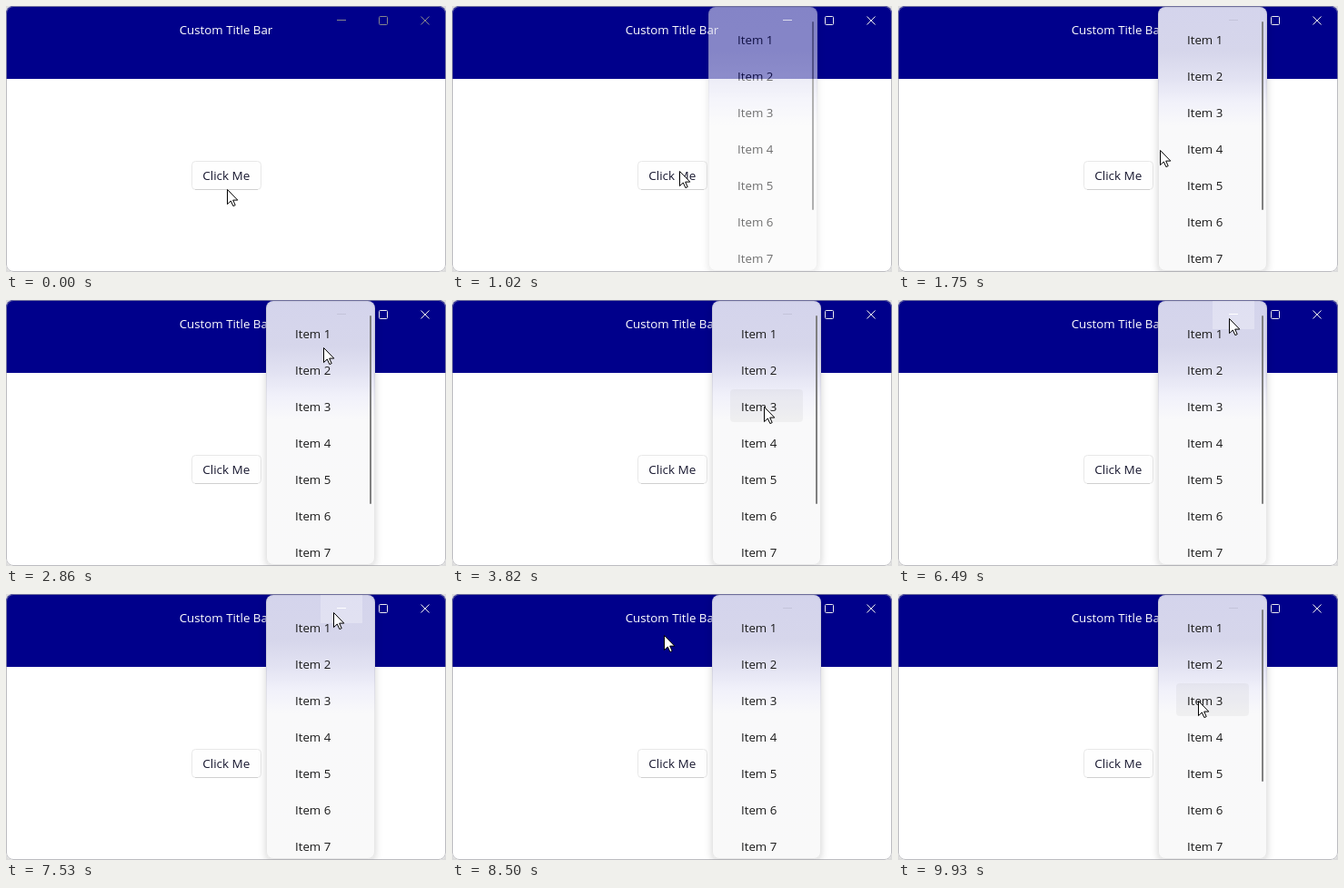
An HTML page for the animation above (10 s loop, 484 by 292 pixels).

```html
<!DOCTYPE html>
<html lang="en">
<head>
<meta charset="utf-8">
<title>Custom title bar</title>
<style>
  html, body { margin: 0; width: 484px; height: 292px; overflow: hidden; background: #dcdcdc; }
  svg { display: block; }
  text { font: 13.3px "Open Sans", "Noto Sans", sans-serif; }
  .mid { text-anchor: middle; }
  .glyph { fill: none; stroke-width: 1; }
  #face { filter: drop-shadow(0 3px 4px rgba(0, 0, 0, .17)); }
</style>
</head>
<body>
<svg width="484" height="292" viewBox="0 0 484 292">
  <defs>
    <linearGradient id="frosted" x1="0" y1="0" x2="0" y2="1">
      <stop offset="0" stop-color="#d4d4ec"/>
      <stop offset=".17" stop-color="#d6d6eb"/>
      <stop offset=".27" stop-color="#e2e2f2"/>
      <stop offset=".36" stop-color="#f1f1fa"/>
      <stop offset=".45" stop-color="#f9f9fa"/>
      <stop offset="1" stop-color="#f9f9f9"/>
    </linearGradient>
    <clipPath id="frame"><rect width="484" height="292" rx="8"/></clipPath>
    <clipPath id="sheet"><rect x="286" y="1" width="120" height="290" rx="8"/></clipPath>
  </defs>

  <g clip-path="url(#frame)">
    <rect width="484" height="292" fill="#fff"/>
    <rect width="484" height="80" fill="#00008b"/>
    <rect x="204.5" y="170.5" width="76" height="31" rx="4" fill="#fefefe" stroke="#e8e8e8"/>
    <path d="M208 201.5H277" stroke="#d0d0d0"/>
    <text id="label" class="mid" x="242.3" y="191" style="font-size:13.5px">Click Me</text>
    <text class="mid" x="242" y="31" fill="#fff">Custom Title Bar</text>
    <g id="caption" class="glyph">
      <path d="M364 15.5H374"/>
      <rect x="410.5" y="11.5" width="9" height="9" rx="1"/>
      <path d="M456.5 11.5L465.5 20.5M465.5 11.5L456.5 20.5"/>
    </g>

    <g id="menu">
      <rect id="face" x="286" y="1" width="120" height="290" rx="8" fill="url(#frosted)"/>
      <rect x="286.5" y="1.5" width="119" height="289" rx="7.5" fill="none" stroke="#000" stroke-opacity=".07"/>
      <rect id="hover" x="306" width="80" height="36" rx="4" fill="#000" fill-opacity=".04"/>
      <g id="items" fill="#1a1a1a" clip-path="url(#sheet)"></g>
      <rect id="thumb" x="400" y="17" width="2" rx="1" fill="#808080"/>
      <rect id="minHover" x="346" y="1" width="46" height="31" fill="#fff" fill-opacity=".28"/>
      <path id="minimize" class="glyph" d="M364 15.5H374"/>
    </g>
    <rect x=".5" y=".5" width="483" height="291" rx="7.5" fill="none" stroke="#a0a0a6" stroke-opacity=".7"/>
  </g>
  <path id="cursor" d="M.5 .5V16.6L4.3 13L6.9 18.6L9.2 17.6L6.7 12.1H11.8Z"
        fill="#fff" stroke="#000" stroke-linejoin="round"/>
</svg>
<script>
const LOOP = 10000, PRESS = 750, OPEN = 1020, SETTLED = 1280, RETURN = 9000;
const TITLE_H = 80, ROW_TOP = 18, ROW_STEP = 40, ROW_H = 36;

// Pointer moves: start time, end time, x and y reached; it rests in between.
const moves = [
  [0, 0, 243, 201],
  [70, 210, 236, 182],
  [340, 480, 250, 181],
  [1470, 2250, 356, 118],
  [2250, 2510, 328, 102],
  [2510, 2860, 349, 52],
  [2860, 3210, 346, 38],
  [3340, 4250, 341, 188],
  [4380, 4860, 344, 100],
  [4860, 5480, 347, 42],
  [5740, 6160, 369, 18],
  [6420, 6490, 364, 20],
  [6490, 6700, 348, 43],
  [6890, 7330, 369, 18],
  [7460, 8500, 233, 45],
  [8500, 9530, 323, 34],
  [9530, 9930, 330, 117]
];

const $ = id => document.getElementById(id);
const set = (id, attrs) => {
  for (const key in attrs) $(id).setAttribute(key, attrs[key]);
};
const within = (v, a, b) => v >= a && v < b;
const progress = (t, a, b) => Math.min(1, Math.max(0, (t - a) / (b - a || 1)));
const mix = (a, b, k) => a + (b - a) * k;

for (let i = 0; i < 7; i++) {
  const item = document.createElementNS("http://www.w3.org/2000/svg", "text");
  item.setAttribute("x", 318);
  item.setAttribute("y", 42 + ROW_STEP * i);
  item.textContent = "Item " + (i + 1);
  $("items").append(item);
}

function pointer(t) {
  let [, , x, y] = moves[0];
  for (const [from, to, toX, toY] of moves) {
    const k = progress(t, from, to);
    x = mix(x, toX, k);
    y = mix(y, toY, k);
  }
  return [Math.round(x), Math.round(y)];
}

function render(t) {
  const [x, y] = pointer(t);
  const open = t >= OPEN, active = t >= PRESS;
  const ease = 1 - (1 - progress(t, OPEN, SETTLED)) ** 2;

  set("cursor", { transform: `translate(${x} ${y})` });
  set("label", { fill: active && !open ? "#62626c" : "#181830" });
  set("caption", { stroke: active ? "#eaeaf0" : "#85858c" });
  set("menu", {
    transform: `translate(${mix(-4, 0, ease)} 0)`,
    opacity: open ? mix(.62, 1, ease) : 0
  });

  // The title bar area swallows pointer input, so only rows below it react.
  const inMenu = y >= TITLE_H && within(x, 306, 386);
  const row = Math.floor((y - ROW_TOP) / ROW_STEP);
  const onRow = inMenu && (y - ROW_TOP) % ROW_STEP < ROW_H;
  set("hover", { y: ROW_TOP + ROW_STEP * row, opacity: onRow ? 1 : 0 });

  const returned = t > RETURN && inMenu;
  set("thumb", { height: returned ? 189 : 207, opacity: t < 7260 || returned ? 1 : 0 });

  const onMin = within(x, 346, 392) && y < 32;
  set("minHover", { opacity: onMin ? 1 : 0 });
  set("minimize", { stroke: onMin ? "#fff" : "#c4c4da", opacity: ease });
}

const start = performance.now();
function tick() {
  render((performance.now() - start) % LOOP);
  requestAnimationFrame(tick);
}
tick();
</script>
</body>
</html>
```
